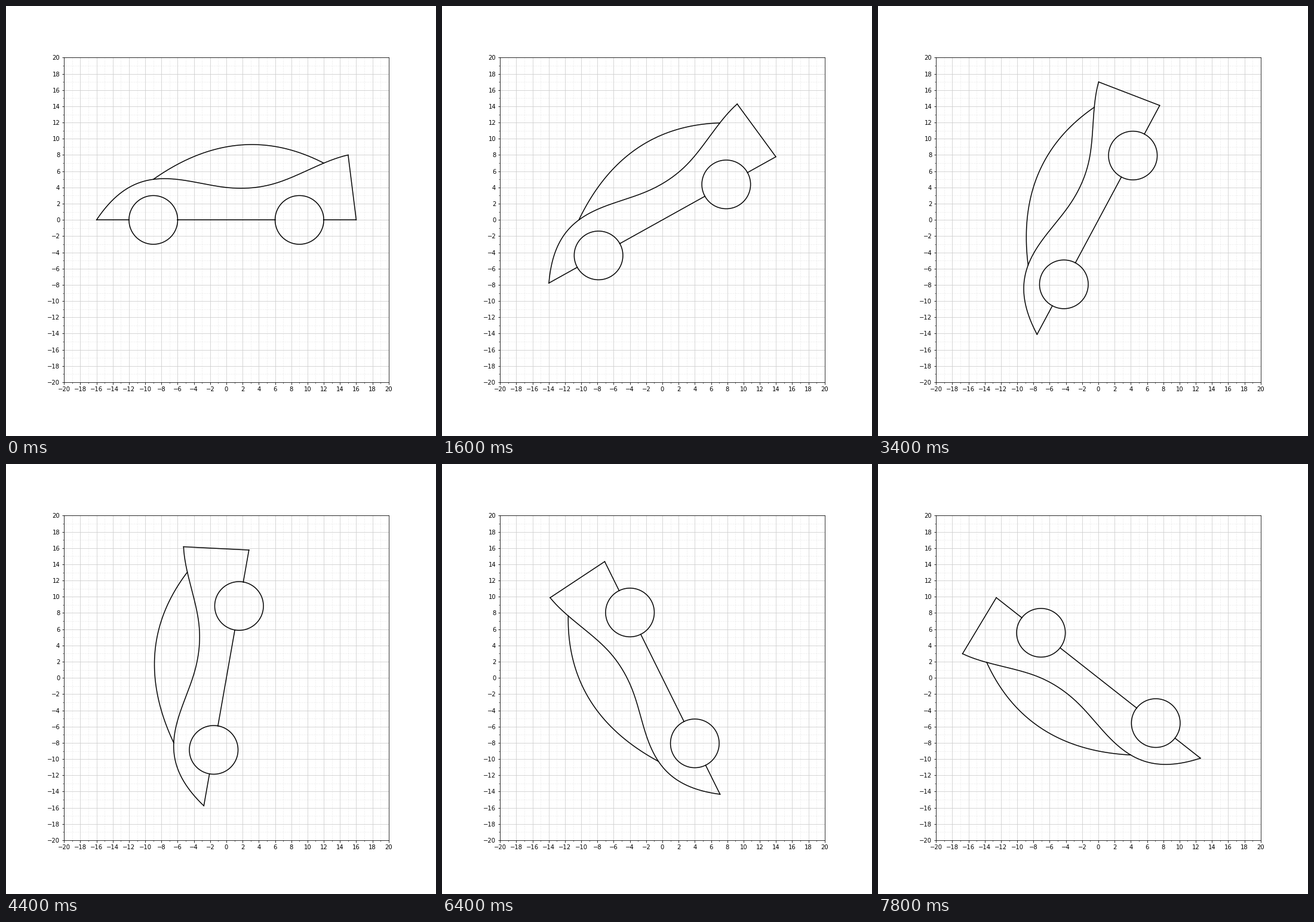
Write a matplotlib script that moves like this. It is 720x720 px and loops after 8000 ms.

```python
import numpy as np
import matplotlib.pyplot as plt
from matplotlib.animation import FuncAnimation
from matplotlib.ticker import MultipleLocator

FRAMES, INTERVAL = 40, 200
STEP = 2 * np.pi / 99  # rotation per frame


def cubic_basis(x, knots):
    powers = [x**k for k in range(4)]
    return np.stack(powers + [np.maximum(x - k, 0) ** 3 for k in knots], axis=-1)


def spline(px, py, x):
    """Cubic not-a-knot spline through the given points."""
    px = np.array(px, float)
    knots = px[2:-2]
    weights = np.linalg.solve(cubic_basis(px, knots), np.array(py, float))
    return np.array([x, cubic_basis(x, knots) @ weights])


def circle(cx, cy, r):
    t = np.linspace(0, 2 * np.pi, 121)
    return np.array([cx + r * np.cos(t), cy + r * np.sin(t)])


def segment(x0, y0, x1, y1):
    return np.array([[x0, x1], [y0, y1]], float)


def car_parts():
    body = spline([-16, -12, -9, 0, 6, 12, 15], [0, 4, 5, 4, 4.5, 7, 8],
                  np.linspace(-16, 15, 200))
    x = np.linspace(-9, 12, 120)
    roof = np.array([x, np.polyval(np.polyfit([-9, 0, 12], [5, 9, 7], 2), x)])
    return [
        body,
        roof,
        segment(15, 8, 16, 0),
        segment(-16, 0, -12, 0),
        segment(-6, 0, 6, 0),
        segment(12, 0, 16, 0),
        circle(-9, 0, 3),
        circle(9, 0, 3),
    ]


fig = plt.figure(figsize=(10, 10), dpi=72, facecolor="white")
ax = fig.add_axes([0.135, 0.125, 0.755, 0.755])
ax.set(xlim=(-20, 20), ylim=(-20, 20))
for axis in (ax.xaxis, ax.yaxis):
    axis.set_major_locator(MultipleLocator(2))
    axis.set_minor_locator(MultipleLocator(1))
ax.grid(which="major", color="#cccccc", lw=0.8)
ax.grid(which="minor", color="#cccccc", lw=0.5, ls=":")

parts = car_parts()
lines = [ax.plot([], [], color="black", lw=1.5)[0] for _ in parts]


def update(frame):
    a = frame * STEP
    rotation = np.array([[np.cos(a), -np.sin(a)], [np.sin(a), np.cos(a)]])
    for line, part in zip(lines, parts):
        line.set_data(*(rotation @ part))
    return lines


anim = FuncAnimation(fig, update, frames=FRAMES, interval=INTERVAL,
                     init_func=lambda: update(0), repeat=True, repeat_delay=0)
plt.show()
```
